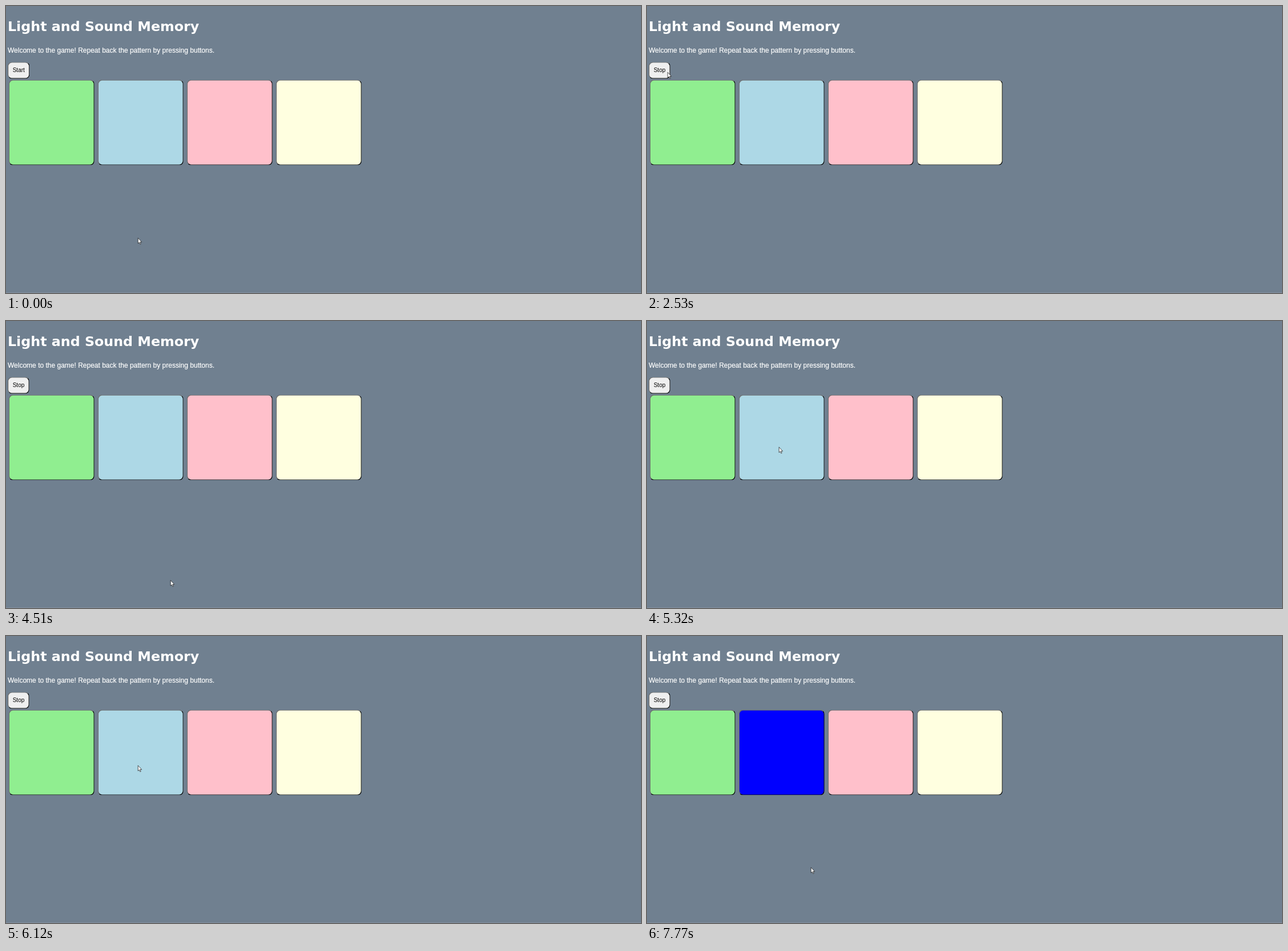
An HTML page that plays this animation: 1112 by 504 pixels, repeating every 8000 ms.

```html
<!DOCTYPE html>
<html lang="en">
<head>
<meta charset="utf-8">
<title>Light and Sound Memory</title>
<style>
html, body { margin: 0; width: 100%; height: 100%; overflow: hidden; background: #708090; }
#page {
  position: absolute; left: 0; top: 0; width: 1854px; height: 840px;
  transform: scale(.6); transform-origin: 0 0;
  color: #fff; font: 20px/24px "Liberation Sans", Arial, sans-serif;
}
#page > * { position: absolute; margin: 0; white-space: nowrap; box-sizing: border-box; }
h1 { left: 5px; top: 33.5px; font: bold 39.56px/50px "DejaVu Sans", Verdana, sans-serif; }
p { left: 5px; top: 116.5px; -webkit-text-stroke: .3px #fff; }
.key {
  border: 2px solid; border-color: #6b6b6b #000 #000 #6b6b6b; border-radius: 12.5px;
}
.key.down { border-color: #000 #6b6b6b #6b6b6b #000; }
#toggle {
  left: 5px; top: 164px; height: 49px; padding: 13px 12.5px; background: #efefef;
  color: #000; font-size: 16.67px; line-height: 19px;
}
.pad { top: 216px; width: 250px; height: 250px; }
#edge { position: absolute; left: 0; right: 0; top: 503px; height: 1px; background: #8491a0; }
#cursor { position: absolute; left: 0; top: 0; width: 9px; height: 14px; overflow: visible; }
</style>
</head>
<body>
<div id="page">
  <h1>Light and Sound Memory</h1>
  <p>Welcome to the game! Repeat back the pattern by pressing buttons.</p>
  <div id="toggle" class="key">Start</div>
</div>
<div id="edge"></div>
<svg id="cursor" viewBox="0 0 9 14">
  <path d="M.2 .4V10L2.3 8.1L3.8 11.4L5.2 10.8L3.8 7.5H6.7Z" fill="#fff" stroke="#111" stroke-width=".7"/>
</svg>
<script>
const LOOP = 8000;
const TICK = 135; // the pointer is redrawn once per tick
const page = document.getElementById("page");
const toggle = document.getElementById("toggle");
const cursor = document.getElementById("cursor");

const pads = ["lightgreen", "lightblue", "pink", "lightyellow"].map((color, i) => {
  const pad = document.createElement("div");
  pad.className = "key pad";
  pad.style.left = 8 + 260 * i + "px";
  pad.style.background = color;
  page.append(pad);
  return pad;
});

// Pointer gestures, each easing from wherever the last one ended.
const home = { x: 231, y: 407 };
const moves = [
  { from: 1080, to: 1900, x: 36, y: 116 },
  { from: 3060, to: 3250, x: 283, y: 144 },
  { from: 3260, to: 3390, x: 285, y: 485 },
  { from: 3400, to: 3520, x: 284, y: 494 },
  { from: 3540, to: 3660, x: 285, y: 456 },
  { from: 4100, to: 4800, x: 290, y: 455 },
  { from: 4880, to: 5280, x: 231, y: 221 },
  { from: 5960, to: 6090, x: 231, y: 227 },
  { from: 6110, to: 6620, x: 285, y: 405 },
  { from: 7580, to: 7710, x: 287, y: 406 }
];

const clamp = u => Math.min(1, Math.max(0, u));
const ease = u => u * u * u * (u * (6 * u - 15) + 10);
const within = (t, from, to) => t >= from && t < to;

function pointer(t) {
  const now = Math.floor((t - 15) / TICK) * TICK + 15;
  let { x, y } = home;
  for (const move of moves) {
    const k = ease(clamp((now - move.from) / (move.to - move.from)));
    x += (move.x - x) * k;
    y += (move.y - y) * k;
  }
  return [Math.round(x), Math.round(y)];
}

function draw(t) {
  const [x, y] = pointer(t);
  cursor.style.transform = `translate(${x}px, ${y}px)`;

  toggle.textContent = t < 2410 ? "Start" : "Stop";
  toggle.classList.toggle("down", within(t, 2290, 2410));

  const pressed = within(t, 5440, 6120);
  const lit = pressed || within(t, 3600, 4510) || t >= 7060;
  pads[1].style.background = lit ? "blue" : "lightblue";
  pads[1].classList.toggle("down", pressed);
}

const start = performance.now();
function tick() {
  draw((performance.now() - start) % LOOP);
  requestAnimationFrame(tick);
}
draw(0);
requestAnimationFrame(tick);
</script>
</body>
</html>
```
